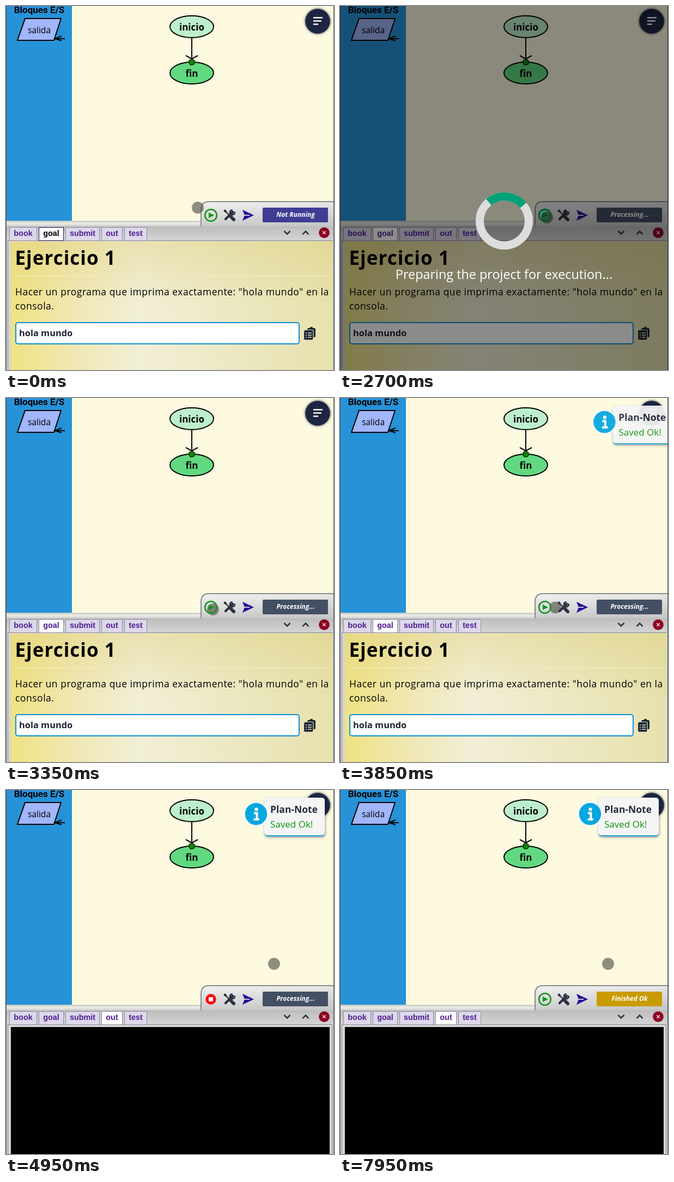
Write an HTML page that moves like this. It is 602x668 px and loops after 8 s.

```html
<!DOCTYPE html>
<html lang="es">
<head>
<meta charset="utf-8">
<title>Ejercicio 1</title>
<style>
  html, body { margin: 0; width: 100%; height: 100%; overflow: hidden; background: #fdfae0; }
  svg { display: block; width: 602px; height: 668px; }
  text { font-family: "Open Sans", "Noto Sans", sans-serif; white-space: pre; }
  .bold { font-weight: 700; }
  .mid { text-anchor: middle; }
  .line { fill: none; stroke: #000; stroke-width: 2; }
  .tab text { font: 700 14.4px "Liberation Sans", Arial, sans-serif; text-anchor: middle; }
</style>
</head>
<body>
<svg viewBox="0 0 602 668" xmlns="http://www.w3.org/2000/svg">
  <defs>
    <linearGradient id="bar" x2="0" y2="1">
      <stop stop-color="#bcbcbc"/><stop offset="1" stop-color="#d4d4d4"/>
    </linearGradient>
    <linearGradient id="split" x2="0" y2="1">
      <stop stop-color="#c9c9c2"/><stop offset=".5" stop-color="#ececea"/><stop offset="1" stop-color="#d2d2d2"/>
    </linearGradient>
    <linearGradient id="dock" x2=".25" y2="1">
      <stop stop-color="#f1f1f1"/><stop offset="1" stop-color="#c9c9c9"/>
    </linearGradient>
    <linearGradient id="paper" x2="1" y2="0">
      <stop stop-color="#efe283"/><stop offset=".2" stop-color="#f0e8b4"/>
      <stop offset=".4" stop-color="#f2efd8"/><stop offset="1" stop-color="#e6e1ac"/>
    </linearGradient>
    <linearGradient id="shade" x2="0" y2="1">
      <stop stop-color="#dccb74" stop-opacity=".38"/><stop offset=".5" stop-color="#dccb74" stop-opacity="0"/>
    </linearGradient>
    <filter id="soft" x="-30%" y="-30%" width="160%" height="160%">
      <feDropShadow dx="1" dy="2" stdDeviation="2" flood-color="#223" flood-opacity=".45"/>
    </filter>
    <filter id="halo" x="-30%" y="-30%" width="160%" height="160%">
      <feDropShadow dx="0" dy="0" stdDeviation="2" flood-color="#223" flood-opacity=".7"/>
    </filter>
  </defs>

  <rect width="602" height="668" fill="#fdfae0"/>

  <!-- block palette -->
  <rect width="121" height="394" fill="#2692d8"/>
  <text x="61" y="13" class="bold mid" style="font-family:Roboto,sans-serif" font-size="17">Bloques E/S</text>
  <path d="M35 23H101L88 63H21Z" class="line" style="fill:#a2b6fb"/>
  <text x="61" y="50" class="mid" font-size="15.6">salida</text>
  <path d="M108 60H90M102 55L90 60L102 64" class="line"/>

  <!-- flowchart -->
  <ellipse cx="341" cy="38" rx="40" ry="20" class="line" style="fill:#beefcd"/>
  <ellipse cx="341" cy="123" rx="40" ry="20" class="line" style="fill:#62d980"/>
  <path d="M341 58V97M330 91L341 97L352 91" class="line"/>
  <circle cx="341" cy="103" r="5.3" fill="#0a870f" stroke="#052c05" stroke-width="1.6"/>
  <text x="341" y="45" class="bold mid" font-size="17">inicio</text>
  <text x="341" y="130" class="bold mid" font-size="17">fin</text>

  <!-- menu button -->
  <circle cx="572" cy="28" r="22.8" fill="#1c2540" stroke="#596073" filter="url(#halo)"/>
  <path d="M565 21.5H580M565 27.5H578M565 33.5H572" stroke="#fff" stroke-width="2.6" stroke-linecap="round"/>

  <!-- dock -->
  <rect y="394" width="602" height="10" fill="url(#split)"/>
  <path d="M358 405V374Q358 359 373 359H603V405Z" fill="url(#dock)" stroke="#8a8a8a" stroke-width="2"/>
  <circle id="glow" cx="376" cy="384" r="12.5" fill="#6ff"/>
  <circle id="pointer" r="10.3" fill="#464638" fill-opacity=".6" stroke="#77756a" stroke-opacity=".5" stroke-width="2"/>
  <g id="play">
    <circle cx="376" cy="384" r="10.8" fill="none" stroke="#12951c" stroke-width="2.5"/>
    <path d="M372 379L382 384L372 389Z" fill="#12951c"/>
  </g>
  <g id="stop">
    <circle cx="376" cy="384" r="9.7" fill="#f00"/>
    <rect x="372" y="380" width="8" height="8" rx="1" fill="#fff"/>
  </g>
  <g fill="none" stroke="#2b3342">
    <path d="M403 391L416 378" stroke-width="4.5" stroke-linecap="round"/>
    <path d="M419.5 377.5A4.3 4.3 0 1 1 415.5 374.5" stroke-width="3"/>
    <path d="M402 376L411 385" stroke-width="2.4"/>
    <path d="M400.5 374.5L404 378" stroke-width="4"/>
    <path d="M412 386L418 392" stroke-width="6" stroke-linecap="round"/>
  </g>
  <path d="M434 374L455 384L434 394L438 384Z" fill="#2c0894"/>
  <path d="M437 384H447" stroke="#dcdce4" stroke-width="1.8"/>
  <rect id="badge" x="471" y="370" width="120" height="27" rx="2"/>
  <text id="status" x="531.5" y="387" class="bold mid" font-style="italic" font-size="12" fill="#fff"></text>

  <!-- tab bar -->
  <rect y="404" width="602" height="264" fill="#d6d6d6"/>
  <rect y="404" width="602" height="26" fill="url(#bar)"/>
  <path d="M3.5 668V430.5H598.5V668" fill="none" stroke="#858585"/>
  <g id="tabs"></g>
  <path d="M510.5 413L516 418.5L521.5 413M544.5 419L550 413.5L555.5 419" fill="none" stroke="#2b3342" stroke-width="2.5"/>
  <circle cx="584" cy="416" r="9.8" fill="#8c0323"/>
  <path d="M581.3 413.3L586.7 418.7M586.7 413.3L581.3 418.7" stroke="#f3d5dc" stroke-width="1.6"/>

  <!-- exercise page -->
  <g id="goal">
    <rect x="9" y="432" width="590" height="236" fill="url(#paper)"/>
    <rect x="9" y="432" width="590" height="236" fill="url(#shade)"/>
    <text x="16.5" y="475" class="bold" font-size="35" letter-spacing="1">Ejercicio 1</text>
    <path d="M17 495.5H594" stroke="#f5efbf"/>
    <g font-size="17.5" letter-spacing=".52">
      <text x="17" y="531">Hacer un programa que imprima exactamente: "hola mundo" en la</text>
      <text x="17" y="556.5">consola.</text>
    </g>
    <rect x="18" y="581" width="520" height="39" rx="4" fill="#fff" stroke="#0d8fd6" stroke-width="2"/>
    <text x="24" y="606" class="bold" font-size="16.4" fill="#1c2331">hola mundo</text>
    <g fill="#1c2535">
      <circle cx="560.5" cy="591.5" r="2.8"/>
      <rect x="553" y="591" width="15" height="17" rx="2.5"/>
      <rect x="546.5" y="594.5" width="17.5" height="18.5" rx="2.5" stroke="#efe9c6" stroke-width="1.2"/>
      <path d="M550 600H552M554 600H561M550 604H552M554 604H561M550 608H552M554 608H561" stroke="#efe9c6" stroke-width="1.5"/>
    </g>
  </g>
  <rect id="console" x="9" y="435" width="585" height="233"/>

  <!-- notification -->
  <g id="toast">
    <g filter="url(#soft)">
      <rect x="474" y="14" width="111" height="71" rx="6" fill="#1ba5da"/>
      <path d="M474 20Q474 14 480 14H579Q585 14 585 20V78Q585 83 579 83H480Q474 83 474 78Z" fill="#f5f5f5"/>
    </g>
    <circle cx="459" cy="44" r="21.5" fill="#06a6df" stroke="#fff" stroke-opacity=".8" stroke-width="3"/>
    <circle cx="459.5" cy="35.5" r="3.2" fill="#fff"/>
    <path d="M455 42.5H460.5V53M454.5 54H465" fill="none" stroke="#fff" stroke-width="4"/>
    <text x="485" y="42" class="bold" font-size="17.5" fill="#242c3d">Plan-Note</text>
    <text x="485" y="69" font-size="17" fill="#0b940b">Saved Ok!</text>
  </g>

  <path d="M.5 0V668M601.5 0V668" stroke="#55554f"/>

  <g id="overlay">
    <rect width="602" height="668" fill-opacity=".455"/>
    <g fill="none" stroke-width="15">
      <circle cx="301.5" cy="394.5" r="45" stroke="#ddd"/>
      <path id="arc" d="M269.68 362.68A45 45 0 0 1 333.32 362.68" stroke="#04a077"/>
    </g>
    <text x="301" y="501" class="mid" font-size="23.4" fill="#fff">Preparing the project for execution...</text>
  </g>
</svg>
<script>
const LOOP = 8000, STEP = 50;
const $ = id => document.getElementById(id);
const show = (id, on) => $(id).setAttribute('display', on ? 'inline' : 'none');
const set = (id, attrs) => {
  for (const k in attrs) $(id).setAttribute(k, attrs[k]);
};
const span = (t, a, b) => Math.min(1, Math.max(0, (t - a) / (b - a)));
const smooth = u => u * u * (3 - 2 * u);

const tabs = [['book', 6, 51], ['goal', 60, 46], ['submit', 109, 63], ['out', 175, 39], ['test', 217, 42]];
$('tabs').innerHTML = tabs.map(([name, x, w]) => `<g class="tab">
  <rect id="tab-${name}" x="${x + .5}" y="406.5" width="${w - 1}" height="24"/>
  <text id="label-${name}" x="${x + w / 2}" y="422">${name}</text></g>`).join('');

// Each move: start time, end time, dx, dy
const moves = [[100, 450, 27, 16], [1000, 1250, 1, 2], [3700, 4350, 112, -69]];

function pointerAt(t) {
  let x = 352, y = 370;
  for (const [a, b, dx, dy] of moves) {
    const p = smooth(span(t, a, b));
    x += dx * p;
    y += dy * p ** 1.5;
  }
  return { cx: x, cy: y };
}

function statusAt(t) {
  if (t < 2700) return ['Not Running', '#3f3d93'];
  if (t < 7900) return ['Processing...', '#434f63'];
  return ['Finished Ok', '#c99b00'];
}

function draw(t) {
  const loading = t >= 2700 && t < 3350;
  const output = t >= 4750;
  const running = output && t < 7900;
  const active = output ? 'out' : 'goal';

  for (const [name] of tabs) {
    const on = name === active, focused = on && t < 2700;
    set('tab-' + name, { fill: on ? '#fff' : '#ddd8ea', stroke: focused ? '#2a0a66' : '#938ba8' });
    set('label-' + name, { fill: focused ? '#000' : '#4f1d90' });
  }
  show('goal', !output);
  show('console', output);
  show('play', !running);
  show('stop', running);
  show('glow', loading);

  const [label, color] = statusAt(t);
  $('status').textContent = label;
  set('badge', { fill: color });

  show('overlay', loading);
  set('arc', { transform: `rotate(${5.5 + (t - 2700) * .36} 301.5 394.5)` });

  show('toast', t >= 3550);
  set('toast', {
    transform: `translate(${165 * (1 - span(t, 3550, 4206)) ** 3} 0)`,
    opacity: span(t, 3550, 3872)
  });
  set('pointer', pointerAt(t));
}

const start = performance.now();
function frame() {
  const t = (performance.now() - start) % LOOP;
  draw(Math.floor(t / STEP) * STEP);
  requestAnimationFrame(frame);
}
frame();
</script>
</body>
</html>
```
